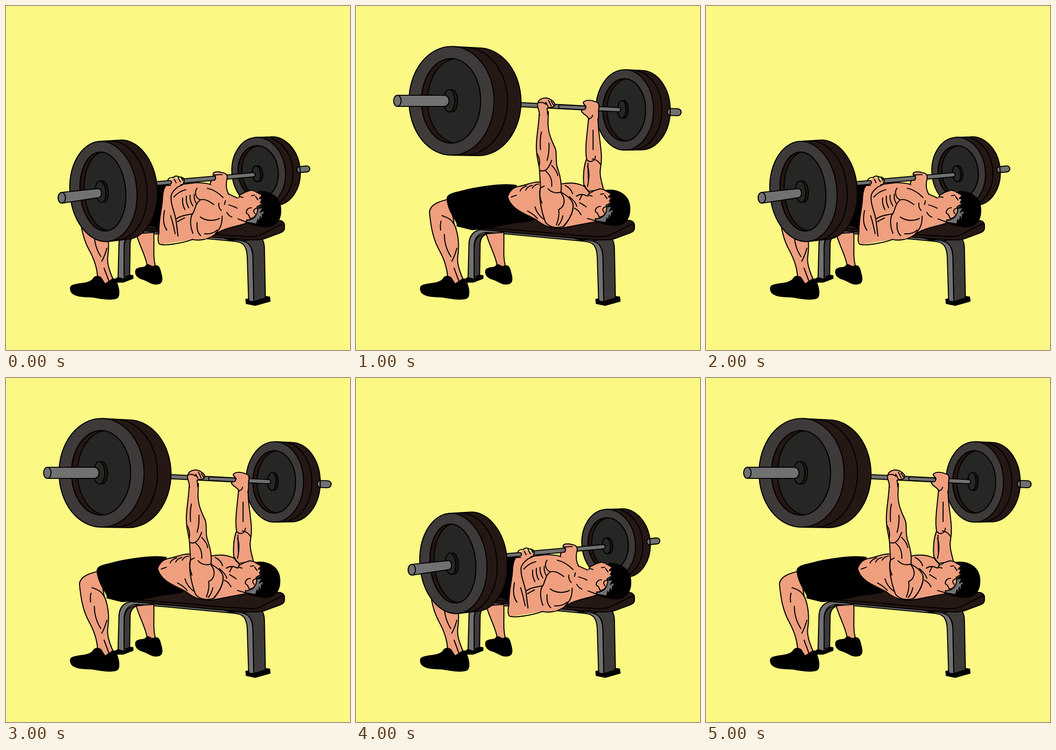
An HTML page that plays this animation: 740x740 px, repeating every 6 s.

```html
<!DOCTYPE html>
<html lang="en">
<head>
<meta charset="utf-8">
<title>Bench press</title>
<style>
  html, body { margin: 0; width: 100%; height: 100%; overflow: hidden; background: #fbf884; }
  svg { display: block; width: 100%; height: 100%; }
  path, ellipse { stroke: #000; stroke-width: 2.2; stroke-linecap: round; stroke-linejoin: round; }
  .skin { fill: #ef9f7e; }
  .steel { fill: #727171; }
  .rim { fill: #3e3a39; }
  .disc { fill: #262624; }
  .brown { fill: #251714; }
  .ink { fill: #000; }
  .line { fill: none; }
  .bare { stroke: none; }
  .down { animation: first 2s step-end infinite; }
  .up { animation: second 2s step-end infinite; }
  @keyframes first { 0% { opacity: 1 } 50%, 100% { opacity: 0 } }
  @keyframes second { 0% { opacity: 0 } 50%, 100% { opacity: 1 } }
</style>
</head>
<body>
<svg id="stage" viewBox="0 0 740 740"></svg>
<script>
const shape = (cls, d) => `<path class="${cls}" d="${d}"/>`;
const lines = d => shape('line', d);
const oval = (cls, x, y, rx, ry) => `<ellipse class="${cls}" cx="${x}" cy="${y}" rx="${rx}" ry="${ry}"/>`;

// A straight tube with an outline, drawn as two stacked strokes.
const tube = (x1, y1, x2, y2, w, cap = 'butt') => [['#000', w + 2.2], ['#727171', w - 2.2]]
  .map(([color, width]) => `<path d="M${x1} ${y1}L${x2} ${y2}" style="stroke:${color};stroke-width:${width};stroke-linecap:${cap}"/>`).join('');

// Stacked weight plates: front face, two sides, recessed disc and hub.
function plate({ x, y, rx, ry, tilt, depth, drop, inner, lip, hub }) {
  const side = k => `M0 ${-ry}L${depth * k} ${drop * k - ry + 1}
    A${rx} ${ry - 1} 0 0 1 ${depth * k} ${drop * k + ry - 1}L0 ${ry}Z`;
  const id = `recess${x}`;
  const [ix, iy] = inner, [hx, hy, hw, hh] = hub;
  return `<g transform="translate(${x} ${y}) rotate(${tilt})">
    <clipPath id="${id}"><ellipse cx="-1" rx="${ix}" ry="${iy}"/></clipPath>
    ${shape('brown', side(1))}${shape('brown', side(.5))}
    ${oval('rim', 0, 0, rx, ry)}${oval('brown', -1, 0, ix, iy)}
    <g clip-path="url(#${id})">${oval('disc', lip - 1, 0, ix, iy)}</g>
    ${oval('line', -1, 0, ix, iy)}
    ${oval('brown', hx + hw * .5, hy, hw, hh)}${oval('disc', hx, hy, hw, hh)}
  </g>`;
}

const bench =
  shape('rim', 'M254 584L254 517C256 500 262 493 280 489L300 488L280 491C270 495 267 503 267 514L266 579Z') +
  shape('steel', 'M241 587L243 512C244 493 253 483 270 481L330 486L470 499L540 501L540 507L500 507L330 491L279 487C263 489 255 498 254 517L254 587Z') +
  shape('ink', 'M235 588L241 584L254 588L266 579L273 580L273 586L252 594L236 594Z') +
  shape('rim', 'M506 506L548 498C554 503 556 512 556 525L558 629L533 636L531 540C531 520 524 509 506 506Z') +
  shape('steel', 'M470 500L506 505C524 508 530 520 531 540L533 636L522 636L519 540C518 519 512 509 496 507Z') +
  shape('ink', 'M516 631L522 630L523 635L533 636L558 628L559 625L567 626L568 635L536 644L517 640Z') +
  shape('brown', 'M268 478L335 462L400 455L585 461Q597 461 599 470L599 479Q598 485 590 488L555 501Q545 504 520 503L450 498L330 487L270 481Z') +
  lines('M276 477L360 483L470 493L520 496Q538 497 548 492L596 468');

const legs =
  shape('skin', 'M280 490L318 487C319 520 316 540 321 558L305 568C303 542 289 520 280 490Z') +
  shape('ink', 'M280 567C288 560 297 566 302 558C305 553 311 561 318 561C326 556 330 560 333 574C338 590 335 598 325 598C312 599 305 591 295 588C283 585 276 577 280 567Z') +
  shape('skin', 'M202 415C184 419 160 425 158 443C161 474 165 500 179 525C191 547 196 565 197 583L212 599L230 587C221 566 217 552 219 538C223 510 220 489 211 468Z') +
  lines('M183 463C180 471 182 478 182 482 M190 491C190 509 195 525 204 539 M217 521C214 532 210 542 206 549 M211 564L221 591 M185 451C198 455 207 460 210 469') +
  shape('ink', 'M140 603C150 595 175 600 187 588C191 579 199 581 204 584L213 598L228 591C232 584 237 587 239 598C244 611 244 624 239 628C225 634 200 628 185 626C165 625 150 625 142 617C138 612 138 606 140 603Z');

const shorts = shape('ink', 'M196 416C195 407 205 403 220 400C260 389 315 381 345 386L326 410C330 430 350 440 382 454C384 464 370 462 345 466C315 470 280 480 249 481L217 473C222 465 199 448 196 416Z');

const head = (dx, dy) => `<g transform="translate(${dx} ${dy})">` +
  shape('skin bare', 'M500 405L508 401L525 393L550 397L556 430L537 456L514 456L496 434L496 412Z') +
  lines('M499 409C499 403 504 402 508 400C514 395 519 396 525 393L536 396') +
  shape('steel', 'M553 420L538 429C541 436 538 444 534 450C529 456 522 457 516 458L514 462L538 468L562 440Z') +
  shape('ink', 'M536 397C565 392 590 408 589 438C589 461 574 474 553 472C536 469 525 468 516 462L537 466L540 456L542 465L545 450L548 461L550 444L553 452L553 436L545 441L551 431L540 432L553 422L545 420L549 412L543 411L549 404Z') +
  lines('M537 432C530 434 529 439 534 444 M526 431C518 431 514 437 515 443C520 444 521 449 523 454C529 454 533 451 535 447') +
  lines('M526 405L533 404 M535 407L540 414 M501 407L508 409') + '</g>';

const lowered =
  plate({ x: 543.5, y: 357.5, rx: 57.5, ry: 75, tilt: -6, depth: 32, drop: 1, inner: [43, 57], lip: 8, hub: [-5, 3, 9, 17] }) +
  tube(632, 352, 647, 350.5, 13, 'round') +
  shape('brown', 'M632 346L633 358') +
  shape('ink', 'M316 378L342 386L338 420L333 450L326 478L310 470Z') +
  // torso
  shape('skin', 'M340 396C350 385 385 383 410 380C440 380 463 390 480 405L500 414L512 440L520 466C500 474 470 477 450 491C436 502 417 506 400 502L340 500Z') +
  tube(380, 376.5, 532, 363, 9) +
  shape('steel', 'M530 358.5C538 358 538 367 531 367.5') +
  // far hand and forearm
  shape('skin bare', 'M446 361C449 355 458 356 464 358C473 358 477 366 475 374C472 387 474 396 479 405L440 384C439 376 443 374 449 374L452 366Z') +
  lines('M440 384C439 376 443 374 448 375C452 372 452 366 446 364C444 359 449 356 455 357C461 356 464 359 468 359C476 361 477 367 475 374C472 387 474 396 479 405 M448 363C454 365 458 361 465 363') +
  // near arm
  shape('skin bare', 'M348 383L360 368L383 377L370 389L355 408L362 440L368 464L400 447L420 416L465 452L430 501L402 502L334 513L328 506L329 487L334 430L341 391Z') +
  lines('M349 377C346 371 355 368 360 369C363 364 370 366 373 368C380 367 385 372 383 378C383 385 377 386 370 389C363 395 357 400 355 408C354 429 363 442 366 463L370 495') +
  lines('M354 386L344 386C335 398 338 414 335 430C333 446 328 465 329 487C327 496 326 507 330 512C340 517 380 510 402 502') +
  tube(322, 382, 352, 379.5, 8, 'round') +
  lines('M341 440C337 460 339 472 346 482 M354 451C359 465 361 478 364 490 M366 458C378 449 391 450 400 447 M369 464C375 460 380 458 384 456') +
  lines('M362 373L366 380 M370 369L375 378 M377 369L380 375 M361 411C367 404 375 398 387 395') +
  lines('M380 413C379 423 381 431 385 438 M388 409C387 419 389 427 393 434 M396 407C395 417 398 424 402 430 M405 405C404 413 406 420 410 426') +
  lines('M411 392C405 399 407 413 418 417C428 414 437 420 447 427 M418 417C405 427 408 440 400 449C395 461 397 477 402 489 M418 454C431 463 447 463 459 457 M411 466C410 480 413 489 419 494 M427 490C439 491 447 489 454 482 M465 452C465 472 460 480 450 490 M433 392C447 395 458 403 467 412 M458 424C457 431 459 436 463 440 M472 419L470 427 M479 428C489 430 496 434 503 438 M475 444C478 449 482 453 486 454 M499 458L515 464') +
  head(2, 3) +
  plate({ x: 209.5, y: 399, rx: 72, ry: 108, tilt: -5, depth: 44, drop: 0, inner: [49, 85], lip: 9, hub: [-6, 0, 11, 23] }) +
  shape('steel', 'M119 401L198 393C207 392 208 410 200 412L122 424Z') +
  oval('steel', 120, 412.5, 8, 11.5);

const raised =
  `<rect width="1" height="740" fill="#fdfcc4"/>` +
  plate({ x: 578, y: 223.5, rx: 62, ry: 86.5, tilt: 0, depth: 36, drop: .5, inner: [46, 67], lip: 9, hub: [-6, -1, 9, 19] }) +
  tube(677, 228, 692, 228.5, 15, 'round') +
  shape('brown', 'M676 221L676 236') +
  tube(350, 212, 565, 223, 9) +
  shape('steel', 'M564 218.5C571 218 571 228 564 227.5') +
  // torso
  shape('skin', 'M326 410C331 396 338 391 350 388C366 386 380 377 398 379L441 383C465 378 488 382 502 396L500 418L514 445L516 464C490 468 466 474 440 478C420 478 405 474 388 460C367 447 334 440 326 410Z') +
  // far arm
  shape('skin', 'M500 244C497 279 492 306 496 329C490 344 488 366 490 384L500 399L532 394C529 379 523 365 526 348C530 328 527 311 525 292C523 275 520 260 521 240Z') +
  shape('skin', 'M486 228C482 222 493 224 495 217C494 212 488 212 489 207C495 201 506 202 515 206C523 207 524 215 522 222C521 233 523 239 520 245C513 249 504 247 500 242C499 236 491 235 486 228Z') +
  shape('skin bare', 'M502 239L519 239L519 252L502 252Z') +
  tube(440, 216.6, 490, 219, 8, 'round') +
  lines('M510 267L510 309 M496 330C503 338 514 335 515 323 M508 329C516 330 522 334 526 341 M499 338C499 353 500 366 500 377 M498 345C502 355 502 370 498 388 M490 384C492 391 495 395 500 397 M500 242C505 243 508 239 509 235') +
  // near arm
  shape('skin', 'M394 234C393 259 387 287 388 306C388 327 395 342 395 357L397 391C392 410 399 443 408 466C418 477 433 478 447 474C458 461 469 442 467 427C464 412 447 405 441 400C443 384 440 367 434 350C428 335 433 322 429 307C421 289 413 275 413 250L414 227Z') +
  shape('skin', 'M391 209C393 200 404 196 414 199C420 201 427 206 428 212C426 217 421 219 415 218L411 220C412 226 413 230 411 234C405 238 397 238 394 233C396 225 388 217 391 209Z') +
  shape('skin bare', 'M396 229L411 229L411 243L396 243Z') +
  lines('M408 207L413 216 M414 203L420 215 M420 205L425 213 M391 209C398 206 404 208 408 211') +
  lines('M399 271C396 283 396 296 397 309 M415 295C416 310 414 322 411 332 M390 318C395 327 396 337 394 345 M396 354C408 358 415 348 421 332 M408 355C419 364 422 376 421 388 M421 343C429 351 433 357 434 365 M397 391C393 402 396 413 400 424 M398 391C403 388 404 388 405 387 M441 400C431 404 420 401 413 393 M441 402C452 416 449 432 436 438 M436 438C438 450 435 461 431 471 M467 427C468 446 457 462 446 474 M445 451C443 460 440 467 435 472') +
  lines('M353 398C356 391 362 389 367 387 M365 396C368 390 373 387 379 386 M379 392C382 386 388 383 393 383 M334 411L345 407 M369 441C377 445 384 450 390 457 M385 432C388 443 394 451 403 458 M450 386C458 390 464 396 466 404 M459 410C466 416 473 423 475 431 M474 409C483 403 490 405 500 410 M486 407L481 417 M481 423C488 427 495 431 503 438 M470 435C476 438 481 443 484 449 M498 457L515 462') +
  head(0, 0) +
  plate({ x: 205.5, y: 204, rx: 91.5, ry: 117, tilt: 0, depth: 58, drop: 2, inner: [63.5, 91], lip: 13, hub: [-5, 0, 12, 24] }) +
  shape('steel', 'M89 192L189 192C204 192 204 216 189 216L89 216Z') +
  oval('steel', 89, 204, 8, 12);

document.getElementById('stage').innerHTML =
  `<rect width="740" height="740" fill="#fbf884"/>` + bench + legs + shorts +
  `<g class="down">${lowered}</g><g class="up">${raised}</g>`;
</script>
</body>
</html>
```
